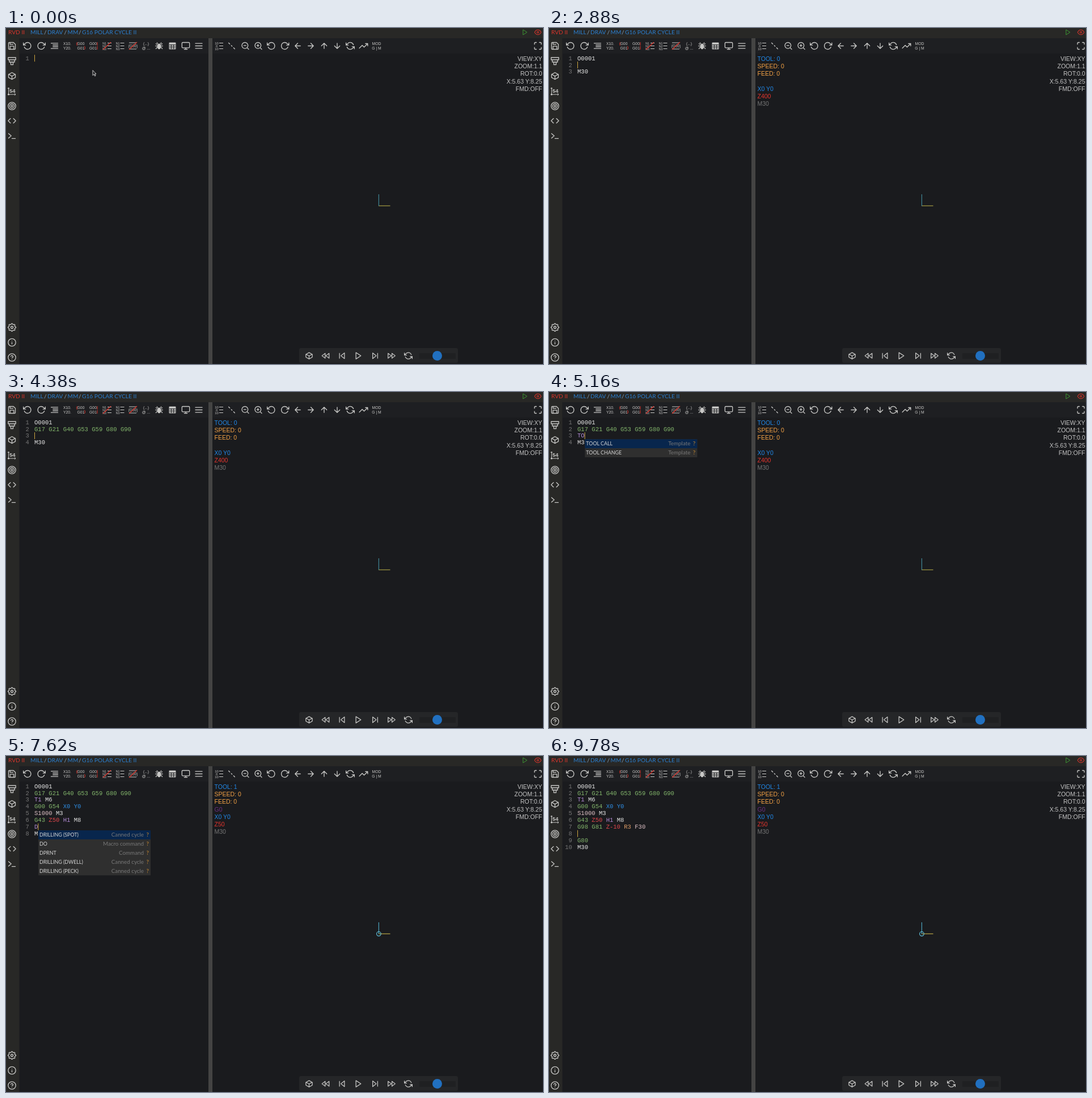
An HTML page for the animation above (9810 ms loop, 947 by 592 pixels).

```html
<!DOCTYPE html>
<html lang="en">
<head>
<meta charset="utf-8">
<title>G-code editor</title>
<style>
html, body { margin: 0; width: 100%; height: 100%; overflow: hidden; background: #1a1b1e; }
svg { display: block; width: 947px; height: 592px; }
text { white-space: pre; }
.ui { font: 10.2px Lato, sans-serif; }
.code { font: 10.55px "Liberation Mono", monospace; }
.info { font: 10.5px "Liberation Sans", Arial, sans-serif; }
.tiny { font: 6.8px "Liberation Sans", Arial, sans-serif; }
</style>
</head>
<body>
<svg viewBox="0 0 947 592">
  <g id="base"></g>
  <g id="panel"></g>
  <g id="editor"></g>
</svg>
<script>
const LOOP = 9810, CHAR = 6.33, LINE = 11.93, LEFT = 50;
const INK = '#c8c8c6', RED = '#d8352c', BLUE = '#2b7fd0';
const $ = id => document.getElementById(id);

const rect = (x, y, w, h, fill, r = 0) =>
  `<rect x="${x}" y="${y}" width="${w}" height="${h}" fill="${fill}" rx="${r}"/>`;
const text = (x, y, s, fill, cls, more = '') =>
  `<text x="${x}" y="${y}" fill="${fill}" class="${cls}" ${more}>${s}</text>`;
const END = 'text-anchor="end"';
const line = (d, color, w = 1) =>
  `<path d="${d}" fill="none" stroke="${color}" stroke-width="${w}"/>`;
const ring = (r, x = 12, y = 12) =>
  `M${x - r} ${y}a${r} ${r} 0 1 0 ${2 * r} 0a${r} ${r} 0 1 0 ${-2 * r} 0`;

// Icons live on a 24 unit grid and are centred at x, y
const icon = (d, x, y, size = 16, color = INK, turn = 0) =>
  `<path d="${d}" transform="translate(${x} ${y}) rotate(${turn}) scale(${size / 24}) translate(-12 -12)"
   fill="none" stroke="${color}" stroke-width="2" stroke-linecap="round" stroke-linejoin="round"/>`;

function gear() {
  let d = '';
  for (let i = 0; i < 64; i++) {
    const a = i * Math.PI / 32, r = 9.2 + 1.3 * Math.cos(8 * a);
    d += `${i ? 'L' : 'M'}${12 + r * Math.cos(a)} ${12 + r * Math.sin(a)}`;
  }
  return d + 'z' + ring(3);
}

const I = {
  save: 'M19 21H5a2 2 0 0 1-2-2V5a2 2 0 0 1 2-2h11l5 5v11a2 2 0 0 1-2 2zM17 21v-8H7v8M7 3v5h8',
  spindle: 'M2 3h20v6H2zM5 9v6h14V9M9 15v7h6v-7',
  box: 'M21 8v8l-9 5-9-5V8l9-5zM3.3 7.5l8.7 5 8.7-5M12 21v-8.5',
  target: ring(10) + ring(6) + ring(2),
  code: 'M16 18l6-6-6-6M8 6l-6 6 6 6',
  prompt: 'M3 18l7-6-7-6M12 19h9',
  gear: gear(),
  info: ring(10) + 'M12 16v-4M12 8h.01',
  help: ring(10) + 'M9.1 9a3 3 0 0 1 5.8 1c0 2-3 3-3 3M12 17h.01',
  undo: 'M1 4v6h6M3.5 15a9 9 0 1 0 2.1-9.4L1 10',
  redo: 'M23 4v6h-6M20.5 15a9 9 0 1 1-2.1-9.4L23 10',
  indent: 'M21 5H3M21 9.7H8M21 14.3H8M21 19H3',
  menu: 'M3 5.5h18M3 12h18M3 18.5h18',
  screen: 'M4 3h16a2 2 0 0 1 2 2v10a2 2 0 0 1-2 2H4a2 2 0 0 1-2-2V5a2 2 0 0 1 2-2zM8 21h8M12 17v4',
  dots: 'M4 4l3 3M11 11l2 2M17 17l3 3',
  minus: ring(8, 11, 11) + 'M21 21l-4.3-4.3M8 11h6',
  plus: ring(8, 11, 11) + 'M21 21l-4.3-4.3M8 11h6M11 8v6',
  arrow: 'M19 12H5M12 19l-7-7 7-7',
  refresh: 'M1 4v6h6M23 20v-6h-6M20.5 9A9 9 0 0 0 5.6 5.6L1 10M23 14l-4.6 4.4A9 9 0 0 1 3.5 15',
  trend: 'M23 6l-9.5 9.5-5-5L1 18M17 6h6v6',
  full: 'M8 3H5a2 2 0 0 0-2 2v3M21 8V5a2 2 0 0 0-2-2h-3M16 21h3a2 2 0 0 0 2-2v-3M3 16v3a2 2 0 0 0 2 2h3',
  play: 'M5 3l14 9-14 9z',
  eye: 'M1 12s4-8 11-8 11 8 11 8-4 8-11 8-11-8-11-8z' + ring(3),
  rewind: 'M11 19l-9-7 9-7zM22 19l-9-7 9-7z',
  skip: 'M19 20L9 12l10-8zM5 19V5',
  bug: 'M8 6l-2-3M16 6l2-3M6 12H2M22 12h-4M6 16l-3 4M18 16l3 4M6 8L3 6M18 8l3-2'
};

// Small lettered toolbar icons: rows of text around a centre
const label = (x, rows, size = 6.8, step = 7.3) => rows.map((s, i) =>
  text(x, 34 + (i - (rows.length - 1) / 2) * step, s, INK, 'tiny',
    `text-anchor="middle" style="font-size:${size}px"`)).join('');
const listLines = x => line(`M${x} 26.5h7M${x} 31.5h7M${x} 36.5h7`, INK);

function drawBase() {
  let s = rect(0, 0, 947, 592, '#1a1b1e') + rect(24, 18, 923, 27, '#1e1f22')
    + rect(0, 0, 947, 18, '#282826') + rect(0, 18, 23.5, 574, '#282826')
    + rect(357, 18, 7, 574, '#444443');

  s += text(4, 11, 'RVD II', RED, 'ui');
  [[43, 'MILL'], [73, 'DRAV'], [108.5, 'MM'], [134, 'G16 POLAR CYCLE II']]
    .forEach(([x, t]) => s += text(x, 11, t, BLUE, 'ui'));
  [67, 102.5, 128].forEach(x => s += text(x, 11, '/', '#8fb0cc', 'ui'));
  s += icon(I.play, 915.5, 7.5, 11.5, '#3f9c35') + icon(I.eye, 938, 7.5, 12.5, RED);

  [['save', 31.5], ['spindle', 58], ['box', 84.5], ['target', 137.5], ['code', 163.5],
   ['prompt', 190], ['gear', 527.5], ['info', 554], ['help', 580.5]]
    .forEach(([n, y]) => s += icon(I[n], 10.5, y));
  s += text(6, 114, '54', INK, 'info', 'style="font-size:9.5px;font-weight:bold"')
    + line('M4.5 117V105M2.8 107l1.7-2 1.7 2M4.5 117H17M15 115.3l2 1.7-2 1.7', INK)
    + `<circle cx="4.5" cy="117" r="1.6" fill="${INK}"/>`;

  [['undo', 38], ['redo', 62], ['indent', 85.5], ['screen', 317], ['menu', 340],
   ['dots', 398], ['minus', 422], ['plus', 445], ['undo', 468], ['redo', 491.5],
   ['refresh', 607], ['trend', 630.5], ['full', 938]]
    .forEach(([n, x]) => s += icon(I[n], x, 31.5));
  [[514.5, 0], [537.5, 180], [561, 90], [584, -90]]
    .forEach(([x, a]) => s += icon(I.arrow, x, 31.5, 16, INK, a));

  s += label(108, ['X10.', 'Y20.']) + label(132, ['G00', 'G01']) + label(153.5, ['G00', 'G01'])
    + line('M125.5 25q-2 3 0 6M138.5 32q2 3 0 6M161 25v6M161 32v6', RED)
    + label(173.5, ['N1', 'N2', 'N3'], 5.2, 5) + listLines(179) + line('M171 38L185 25', RED, 1.3)
    + label(197, ['N1', 'N2', 'N3'], 5.2, 5) + listLines(201.5)
    + label(224, ['(G00)'], 6.5) + line('M217 26h13M217 37h13', INK) + line('M217 38L231 25', RED, 1.3)
    + label(247, ['(...)', '@ ...'])
    + icon(I.bug, 270, 31.5, 15) + `<ellipse cx="270" cy="32.5" rx="3.4" ry="5" fill="${INK}"/>`
    + rect(287.5, 25.5, 12, 12, INK, 1)
    + line('M288 29.5h11M288 32.2h11M288 34.9h11M291.5 29v8M295.5 29v8', '#1e1f22', .9)
    + label(371.5, ['10', '0', '10'], 5.8, 5.4) + listLines(376)
    + label(653.5, ['MOD', 'G | M']);

  s += rect(517, 564, 280, 26, '#252628', 3) + rect(729, 573, 64, 10, '#1f2022', 1);
  [['box', 534.5], ['rewind', 563.5], ['skip', 592.5], ['play', 621.5], ['refresh', 709.5]]
    .forEach(([n, x]) => s += icon(I[n], x, 577.5, 15));
  s += icon(I.skip, 651, 577.5, 15, INK, 180) + icon(I.rewind, 680, 577.5, 15, INK, 180)
    + '<circle cx="760.5" cy="577.5" r="8.5" fill="#2170c0"/>';

  ['VIEW:XY', 'ZOOM:1.1', 'ROT:0.0', 'X:5.63 Y:8.25', 'FMD:OFF'].forEach((t, i) =>
    s += text(945.5, 57.8 + i * 13.25, t, '#c4c4c4', 'info', END));
  $('base').innerHTML = s;
}

// Axis cross and machine read-out: 0 hidden, 1 idle, 2 tool loaded
function drawPanel(mode) {
  let s = line('M657 313.3h20.5', mode > 1 ? '#b9a544' : '#a39a42', 1.2)
    + line('M657.4 293v20.5', mode > 1 ? '#4ba3bd' : '#3f8796', 1.2);
  if (mode) {
    const hot = mode > 1;
    if (hot) s += `<circle cx="657.4" cy="313.3" r="3.8" fill="none" stroke="#62c3de" stroke-width="1.2"/>`;
    [['TOOL: ' + (hot ? 1 : 0), '#2187e6'], ['SPEED: 0', '#f0a045'], ['FEED: 0', '#f0a045'],
     [hot ? 'G0' : '', '#6b2f80'], ['X0 Y0', '#2187e6'], [hot ? 'Z50' : 'Z400', '#e2352e'], ['M30', '#757575']]
      .forEach(([t, c], i) => s += text(367.5, 57.8 + i * 13.25, t, c, 'info'));
  }
  $('panel').innerHTML = s;
}

const TINT = { G: '#82b56b', T: '#b28ad4', H: '#b28ad4', D: '#b28ad4', X: '#2f8fe6', Y: '#2f8fe6',
  Z: '#dd464c', S: '#dcbfc4', R: '#dd9c66', F: '#dcbfc4' };
const SAFE = 'O0001\nG17 G21 G40 G53 G59 G80 G90\n';
const CALL = ' M6\nG00 G54 X0 Y0\nS1000 M3\nG43 Z50 H1 M8\n';
const BODY = SAFE + 'T1' + CALL;
const HINTS = {
  O: [['O0001', 'Program']],
  S: [['SAFETY LINE', 'Template'], ['SAFETY START', 'Template']],
  T: [['TOOL CALL', 'Template'], ['TOOL CHANGE', 'Template']],
  D: [['DRILLING (SPOT)', 'Canned cycle'], ['DO', 'Macro command'], ['DPRNT', 'Command'],
      ['DRILLING (DWELL)', 'Canned cycle'], ['DRILLING (PECK)', 'Canned cycle']]
};
// [time, text with | as caret, hint list]
const STEPS = [
  [0, '|'],
  [540, 'O|', 'O'],
  [1140, 'O0|', 'O'],
  [1260, 'O0001|\nM30'],
  [1860, 'O0001\n|\nM30'],
  [3480, 'O0001\nS|\nM30', 'S'],
  [3960, 'O0001\nSA|\nM30', 'S'],
  [4050, SAFE + '|\nM30'],
  [4500, SAFE + 'T|\nM30', 'T'],
  [4950, SAFE + 'TO|\nM30', 'T'],
  [5310, SAFE + 'T1|' + CALL + '\nM30'],
  [5970, BODY + '|\nM30'],
  [7410, BODY + 'D|\nM30', 'D'],
  [7950, BODY + 'G98 G81 Z-10| R3 F30\n\nG80\nM30'],
  [9330, BODY + 'G98 G81 Z-10 R3 F30\n|\nG80\nM30']
];
const CARET_OFF = [[120, 540], [1680, 1860], [2340, 2760], [5730, 5970], [8340, 8760]];

// The mouse pointer hides as soon as typing begins
const POINTER = line('M153 74.5v9l2-2 1.6 3.2 1.5-.7-1.6-3.1h2.5z', '#ddd', .9);

function drawEditor(n, caretOn) {
  const [, src, hint] = STEPS[n];
  let s = n ? '' : POINTER, pop = '';
  src.split('\n').forEach((row, i) => {
    const mid = 53.2 + i * LINE, col = row.indexOf('|');
    s += text(40.8, mid + 3.4, i + 1, '#747474', 'code', END);
    let at = 0;
    row.replace('|', '').split(' ').forEach(word => {
      s += text(LEFT + at * CHAR, mid + 3.4, word, TINT[word[0]] || '#e6e6e6', 'code');
      at += word.length + 1;
    });
    if (col < 0) return;
    const x = LEFT + col * CHAR;
    if (caretOn) s += rect(x, mid - 6, 1, 12, '#cda53f');
    if (hint) pop = popup(x + .7, mid + 6.2, HINTS[hint]);
  });
  $('editor').innerHTML = s + pop;
}

function popup(x, y, rows) {
  const h = 15.85;
  let s = rect(x, y, 198, rows.length * h, '#2f2f2f') + rect(x, y, 198, h, '#08264d');
  rows.forEach(([name, kind], i) => {
    const base = y + i * h + 11.2;
    s += text(x + 2, base, name, '#d6d6d6', 'ui', 'style="font-size:8.9px"')
      + text(x + 186, base, kind, '#787878', 'ui', END + ' style="font-size:9.8px"')
      + text(x + 190.5, base, '?', '#c98a30', 'ui', 'style="font-size:10px"');
  });
  return s;
}

let shown = '', panelShown = -1;
const start = performance.now();
function frame() {
  const t = Math.max(0, performance.now() - start) % LOOP;
  const n = STEPS.filter(s => s[0] <= t).length - 1;
  const caretOn = !CARET_OFF.some(([a, b]) => t >= a && t < b);
  const mode = t < 2580 ? 0 : t < 6690 ? 1 : 2;
  if (mode !== panelShown) drawPanel(panelShown = mode);
  if (shown !== n + '' + caretOn) {
    shown = n + '' + caretOn;
    drawEditor(n, caretOn);
  }
  requestAnimationFrame(frame);
}
drawBase();
frame();
</script>
</body>
</html>
```
